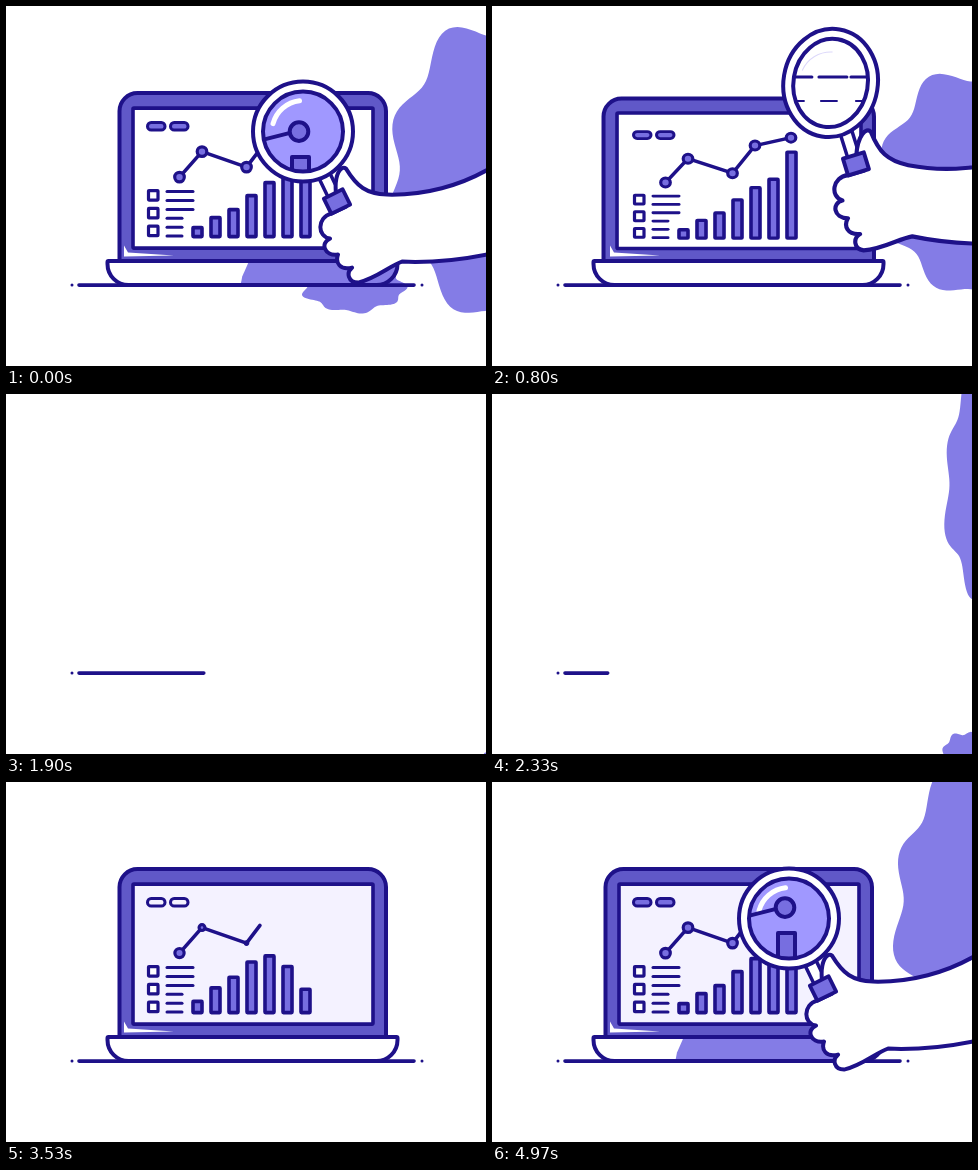
An HTML page with a canvas for the animation above (5 s loop, 480 by 360 pixels).

```html
<!DOCTYPE html>
<html lang="en">
<head>
<meta charset="utf-8">
<title>Laptop and magnifier</title>
<style>
html, body { margin: 0; width: 100%; height: 100%; overflow: hidden; background: #fff; }
canvas { display: block; }
</style>
</head>
<body>
<canvas id="stage" width="480" height="360"></canvas>
<script>
const c = document.getElementById('stage').getContext('2d');
const INK = '#1e1189', BLOB = '#847ce6', BEZEL = '#6058c8', ACCENT = '#776ee0', PALE = '#f4f2ff';
const LOOP = 5000;

const clamp = v => Math.max(0, Math.min(1, v));
const span = (t, from, to) => clamp((t - from) / (to - from));
const mix = (a, b, u) => Array.isArray(a) ? a.map((v, i) => v + (b[i] - v) * u) : a + (b - a) * u;
const back = (u, s) => 1 + (s + 1) * (u - 1) ** 3 + s * (u - 1) ** 2;

// Linear track: at(t, time, value, time, value, ...)
function at(t, ...keys) {
  if (t <= keys[0]) return keys[1];
  for (let i = 2; i < keys.length; i += 2) {
    if (t <= keys[i]) return mix(keys[i - 1], keys[i + 1], span(t, keys[i - 2], keys[i]));
  }
  return keys[keys.length - 1];
}

function paint(fill, width = 3.6) {
  if (fill) { c.fillStyle = fill; c.fill(); }
  if (width) { c.lineWidth = width; c.strokeStyle = INK; c.stroke(); }
}
function rect(x, y, w, h, r, fill, width) {
  c.beginPath();
  c.roundRect(x, y, w, h, r);
  paint(fill, width);
}
function dot(x, y, r, fill, width) {
  c.beginPath();
  c.arc(x, y, r, 0, 7);
  paint(fill, width);
}
function line(...p) {
  c.beginPath();
  for (let i = 0; i < p.length; i += 2) c.lineTo(p[i], p[i + 1]);
}

// Ellipse with a wavy edge
function blob([x, y, rx, ry]) {
  if (rx < 1) return;
  c.beginPath();
  for (let a = 0; a < 6.28; a += 0.03) {
    const r = 1 + 0.07 * Math.cos(9 * (a + 2.8)) + 0.03 * Math.sin(5 * a);
    c.lineTo(x + rx * r * Math.cos(a), y + ry * r * Math.sin(a));
  }
  paint(BLOB, 0);
}

function background(t) {
  const none = [530, 140, 0, 0];
  blob(at(t, 0, [510, 165, 125, 150], 800, [500, 177, 112, 114], 1150, none,
    1630, none, 2330, [500, 92, 46, 120], 2670, none,
    3750, none, 4170, [490, 140, 36, 60], 4970, [500, 120, 95, 138]));
  blob(at(t, 0, [348, 280, 50, 25], 700, [370, 278, 0, 0],
    3900, [396, 277, 0, 0], 4170, [396, 277, 14, 12], 4600, [390, 277, 0, 0]));
  blob(at(t, 1630, [490, 370, 0, 0], 2330, [475, 362, 25, 24], 2670, [490, 370, 0, 0]));
}

function ground(t) {
  const end = 73 + 335 * at(t, 1650, 1, 2050, 0, 2280, 0, 2680, 1);
  dot(66, 278.5, 1.5, INK, 0);
  if (end > 73) { line(73, 278.5, end, 278.5); paint(); }
  if (end > 407) dot(416, 278.5, 1.5, INK, 0);
}

const POINTS = [[173.5, 170.5], [196, 145], [240.5, 160.5], [263, 131], [299, 122.5]];
const BARS = [9, 19, 27, 41, 54, 63, 92];

function charts(t) {
  const shown = (from, time) => t < 1200 ? 1 : span(t, from, from + time);
  const grow = shown(3180, 200);
  for (const x of [141.5, 164.5]) {
    rect(x, 116, 17.5 * grow, 7.5, 3.7, shown(3700, 1) ? ACCENT : PALE, 3);
  }
  for (let i = 0; i < 6; i++) {
    const y = 185 + i * 8.9;
    if (i % 2 == 0) rect(142.5, y - 1, 9.5 * grow, 9.5, 0.5, '#fff', 3.2);
    line(161, y, 161 + (i < 3 ? 26 : 15) * grow, y);
    paint(null, 3);
  }
  BARS.forEach((h, i) => {
    const u = shown(3146 + 60 * i, 600), k = h * Math.max(0.02, back(u, 3.5));
    if (u) rect(187 + 18 * i, 230 - k, 9, k, 0.5, ACCENT);
  });

  let left = 158 * shown(3240, 445);
  const path = [...POINTS[0]];
  for (let i = 1; i < POINTS.length && left > 0; i++) {
    const [a, b] = [POINTS[i - 1], POINTS[i]], len = Math.hypot(b[0] - a[0], b[1] - a[1]);
    path.push(...mix(a, b, clamp(left / len)));
    left -= len;
  }
  line(...path);
  paint();
  POINTS.forEach(([x, y], i) => {
    const u = shown(3300 + 85 * i, 240);
    if (u) dot(x, y, 4.8 * u, ACCENT, 3.2);
  });
}

function laptop(t) {
  const b = at(t, 1180, 1, 1330, 0.54, 1600, 0, 2700, 0, 2820, 1);
  const k = t < 2000 ? 1 - span(t, 600, 1230) ** 3 : back(span(t, 2800, 3200), 3);
  const shut = at(t, 1180, 0, 1330, 1, 1560, 0, 2700, 0, 2770, 1, 2860, 0);
  const top = 278.5 - 24 * b;
  if (b <= 0) return;

  if (k > 0.02) {
    // The lid looks wider as it tips forward
    const h = 168 * k, r = Math.min(18, h / 2), wide = 11 * Math.sqrt(Math.max(0, 1 - k));
    rect(113.5 - wide, top - h, 266.5 + 2 * wide, h, [r, r, 0, 0], BEZEL, 4);
    rect(127 - wide, top - 153 * k, 240 + 2 * wide, 140 * k, 1, t < 1200 ? '#fff' : PALE);
    if (k > 0.5 && (t < 1200 || t > 3180)) {
      c.save();
      c.translate(0, 254);
      c.scale(1, 2 * Math.min(1, k) - 1);
      c.translate(0, -254);
      charts(t);
      c.restore();
    }
    if (k > 0.9) {
      line(118, 239, 122, 246, 168, 249, 118, 250);
      paint('#fff', 0);
    }
  }
  if (shut > 0.05) {
    const h = 27 * shut;
    rect(102, top - 2 - h, 289, h, [18 * shut, 18 * shut, 9 * shut, 9 * shut], '#fff', 4);
    line(114, top - 4, 379, top - 4);
    paint(null, 4);
  }

  const r = 3 + 18 * span(b, 0.54, 1), base = [101.5, top, 290, 278.5 - top, [1, 1, r, r]];
  const split = at(t, 0, 243, 650, 400, 3900, 400, 4170, 243, 4970, 192);
  rect(...base, '#fff', 0);
  c.save();
  c.clip();
  line(split, 254, 400, 254, 400, 280, split - 9, 280, split - 7, 270);
  paint(BLOB, 0);
  c.restore();
  rect(...base, null, 4);
}

const HAND = new Path2D(`M330 187C328 168 335 158 340 162C351 180 360 187 381 188
  C420 189 455 178 480 164L680 60V225L480 248C450 254 420 256 396 255
  C384 259 370 272 352 276C342 276 340 266 346 261C334 264 329 256 332 248
  C318 250 314 236 324 232C311 230 311 211 325 207L340 200Z`);

function magnifier(t) {
  const leaving = t < 1150;
  if (!leaving && t < 3650) return;
  const away = (leaving ? t / 1150 : 1 - span(t, 3650, 4970)) ** 6.2;
  const x = 331 + 310 * away, y = (leaving ? 195 : 206) - 355 * away, turn = 29 * Math.sqrt(away);
  const tint = at(t, 0, 1, 500, 0.7, 750, 0, 4170, 0, 4600, 1), clear = tint < 0.4;
  const lx = 297 - 0.45 * turn, ly = 125 - 0.6 * turn;
  const oval = inset => {
    c.beginPath();
    c.ellipse(lx, ly, 51 - 0.3 * turn - inset, 51 + 0.45 * turn - inset, 0, 0, 7);
  };

  c.save();
  c.translate(x, y);
  c.rotate(turn * Math.PI / 180);
  c.translate(-331, -195);

  line(lx + 5, ly + 10, 329, 191);
  paint(null, 15.5);
  c.strokeStyle = '#fff';
  c.lineWidth = 8.5;
  c.stroke();

  oval(1);
  paint('#fff', 4);
  oval(11);
  c.globalAlpha = tint;
  paint('#a098ff', 0);
  c.globalAlpha = 1;

  c.save();
  c.clip();
  c.beginPath();
  c.arc(lx, ly, 31, 3.4, 4.6);
  c.strokeStyle = clear ? '#dcd8fa' : '#fff';
  c.lineWidth = 1 + 4 * tint;
  c.stroke();
  c.setTransform(1, 0, 0, 1, 0, 0.6);
  if (leaving && clear) {
    for (const [dy, dash, width] of [[-6, [16, 7, 28, 4], 3], [18, [8, 17, 16, 19], 2]]) {
      c.setLineDash(dash);
      line(x - 60, y - 81 + dy, x + 12, y - 81 + dy);
      paint(null, width);
    }
    c.setLineDash([]);
  } else {
    if (!clear) {
      rect(286, 150.5, 17, 90, 0, ACCENT, 4);
      line(250, 135, 293, 124);
      paint(null, 4);
    }
    dot(293, 125, 9.3, clear ? '#fff' : ACCENT, 4);
  }
  c.restore();
  oval(11);
  paint(null, 4);

  c.translate(331, 195);
  c.scale(1 + 0.004 * turn, 1 + 0.004 * turn);
  c.translate(-331, -195);
  c.fillStyle = '#fff';
  c.fill(HAND);
  c.lineWidth = 4;
  c.stroke(HAND);
  c.translate(331, 195);
  c.rotate(-0.46);
  rect(-10.5, -8.5, 21, 17, 0, ACCENT, 3.8);
  c.restore();
}

function frame() {
  const t = performance.now() % LOOP;
  c.setTransform(1, 0, 0, 1, 0, 0);
  c.fillStyle = '#fff';
  c.fillRect(0, 0, 480, 360);
  c.translate(0, 0.6);
  c.lineCap = c.lineJoin = 'round';
  background(t);
  ground(t);
  laptop(t);
  magnifier(t);
  requestAnimationFrame(frame);
}
frame();
</script>
</body>
</html>
```
